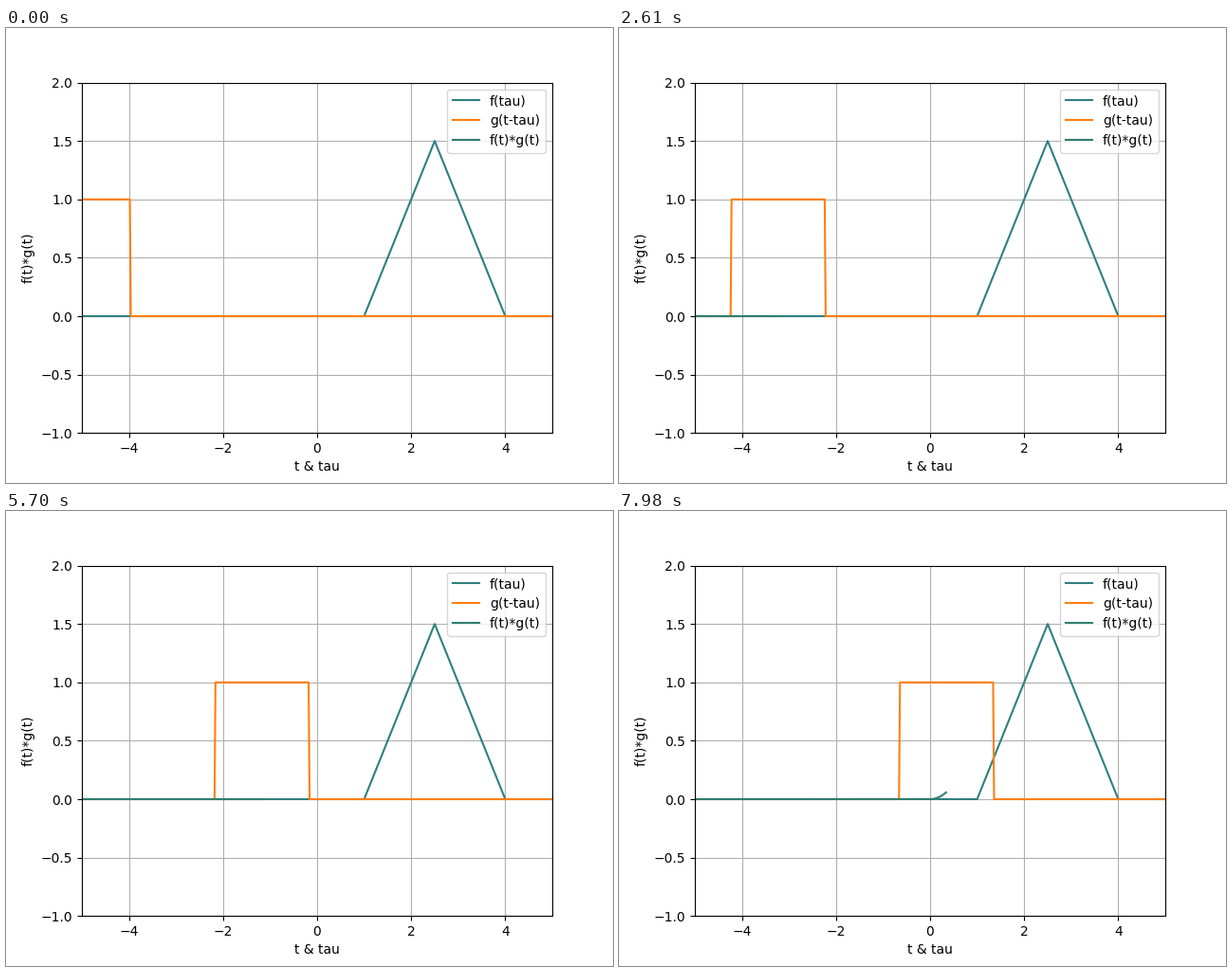
A matplotlib script that plays this animation: 640x480 px, repeating every 8000 ms.

```python
import numpy as np
import matplotlib.pyplot as plt
from matplotlib.animation import FuncAnimation

LOOP_MS = 8000
STEPS = 267
DX = 0.02
HALF = 50  # half width of the box, in samples

plt.rcParams["font.family"] = "DejaVu Sans"

index = np.arange(501)
tau = index * DX - 5


def triangle(x):
    return np.clip(1.5 - np.abs(x - 2.5), 0, None)


def box(k):
    """Unit box of width 2 centred on sample k."""
    return ((index > k - HALF) & (index <= k + HALF)).astype(float)


# Running integral of the triangle over the box, on a padded axis.
padded = np.arange(-HALF, len(tau) + HALF) * DX - 5
area = np.cumsum(triangle(padded)) * DX
area -= triangle(padded) * DX / 2
conv = area[2 * HALF:] - area[:-2 * HALF]

fig, ax = plt.subplots(figsize=(6.4, 4.8), dpi=100)
ax.plot(tau, triangle(tau), color="#2f7f7f", label="f(tau)")
box_line, = ax.plot([], [], color="#ff7f0e", label="g(t-tau)")
conv_line, = ax.plot([], [], color="#2f7f6f", label="f(t)*g(t)")
ax.set_xlim(-5, 5)
ax.set_ylim(-1, 2)
ax.set_xlabel("t & tau")
ax.set_ylabel("f(t)*g(t)")
ax.grid(True)
ax.legend(loc="upper right")


def update(step):
    k = step + 1
    box_line.set_data(tau, box(k))
    conv_line.set_data(tau[:k + 1], conv[:k + 1])
    return box_line, conv_line


def init():
    return update(0)


anim = FuncAnimation(fig, update, frames=STEPS, init_func=init,
                     interval=LOOP_MS / STEPS, repeat=True, repeat_delay=0,
                     blit=False)
plt.show()
```
